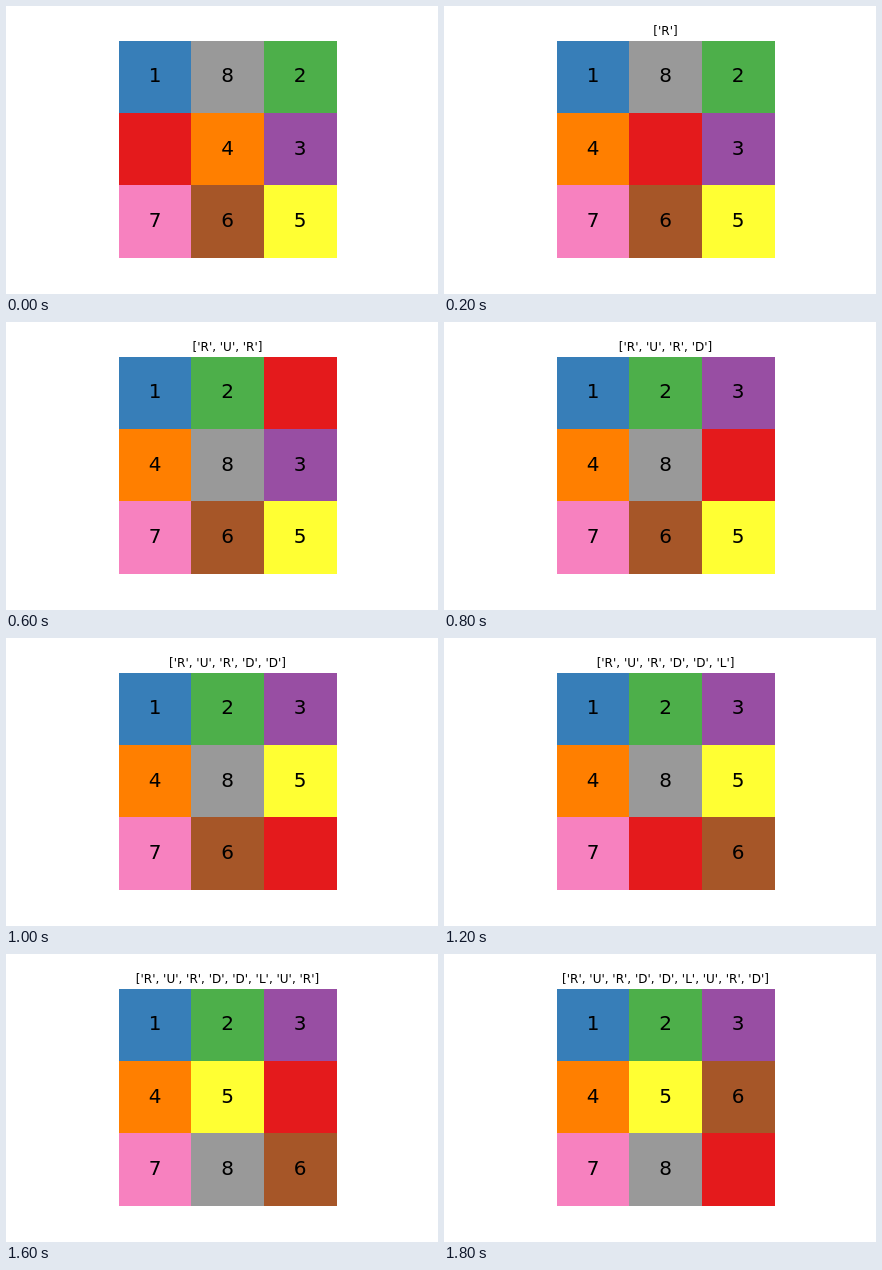
Animation, 432 px wide and 288 px high, one loop 2 s. Source, as an HTML page:

```html
<!DOCTYPE html>
<html lang="en">
<head>
<meta charset="utf-8">
<title>Sliding puzzle</title>
<style>
  html, body { margin: 0; width: 100%; height: 100%; overflow: hidden; background: #fff; }
  svg { display: block; width: 432px; height: 288px; }
  text { font-family: "DejaVu Sans", sans-serif; font-size: 20px; text-anchor: middle; }
  #moves { font-size: 12px; }
</style>
</head>
<body>
<svg viewBox="0 0 432 288">
  <text id="moves" x="221.5" y="29"></text>
  <g id="board"></g>
</svg>
<script>
  const STEP = 200;
  const MOVES = [...'RURDDLURD'];
  const START = [1, 8, 2, 0, 4, 3, 7, 6, 5];
  const SHIFT = { L: -1, R: 1, U: -3, D: 3 };
  const COLORS = ['#e41a1c', '#377eb8', '#4daf4a', '#984ea3', '#ff7f00',
                  '#ffff33', '#a65628', '#f781bf', '#999999'];
  const X = [113, 185, 258, 331];
  const Y = [35, 107, 179, 252];
  const BASE = [76, 149, 221];

  const title = document.getElementById('moves');
  const board = document.getElementById('board');

  function add(tag, attrs) {
    const el = document.createElementNS('http://www.w3.org/2000/svg', tag);
    for (const key in attrs) el.setAttribute(key, attrs[key]);
    return board.appendChild(el);
  }

  const cells = START.map((_, i) => {
    const c = i % 3, r = Math.floor(i / 3);
    return {
      rect: add('rect', {
        x: X[c], y: Y[r], width: X[c + 1] - X[c], height: Y[r + 1] - Y[r],
        'shape-rendering': 'crispEdges'
      }),
      label: add('text', { x: 149 + 72.5 * c, y: BASE[r] })
    };
  });

  // Each move slides the blank cell one place.
  const states = [START];
  for (const move of MOVES) {
    const next = [...states[states.length - 1]];
    const from = next.indexOf(0), to = from + SHIFT[move];
    [next[from], next[to]] = [next[to], next[from]];
    states.push(next);
  }

  let shown = -1;

  function draw(step) {
    states[step].forEach((n, i) => {
      cells[i].rect.setAttribute('fill', COLORS[n]);
      cells[i].label.textContent = n || '';
    });
    const list = MOVES.slice(0, step).map(m => `'${m}'`).join(', ');
    title.textContent = step ? `[${list}]` : '';
    shown = step;
  }

  function tick() {
    const step = Math.floor(performance.now() / STEP) % states.length;
    if (step !== shown) draw(step);
    requestAnimationFrame(tick);
  }

  tick();
</script>
</body>
</html>
```
